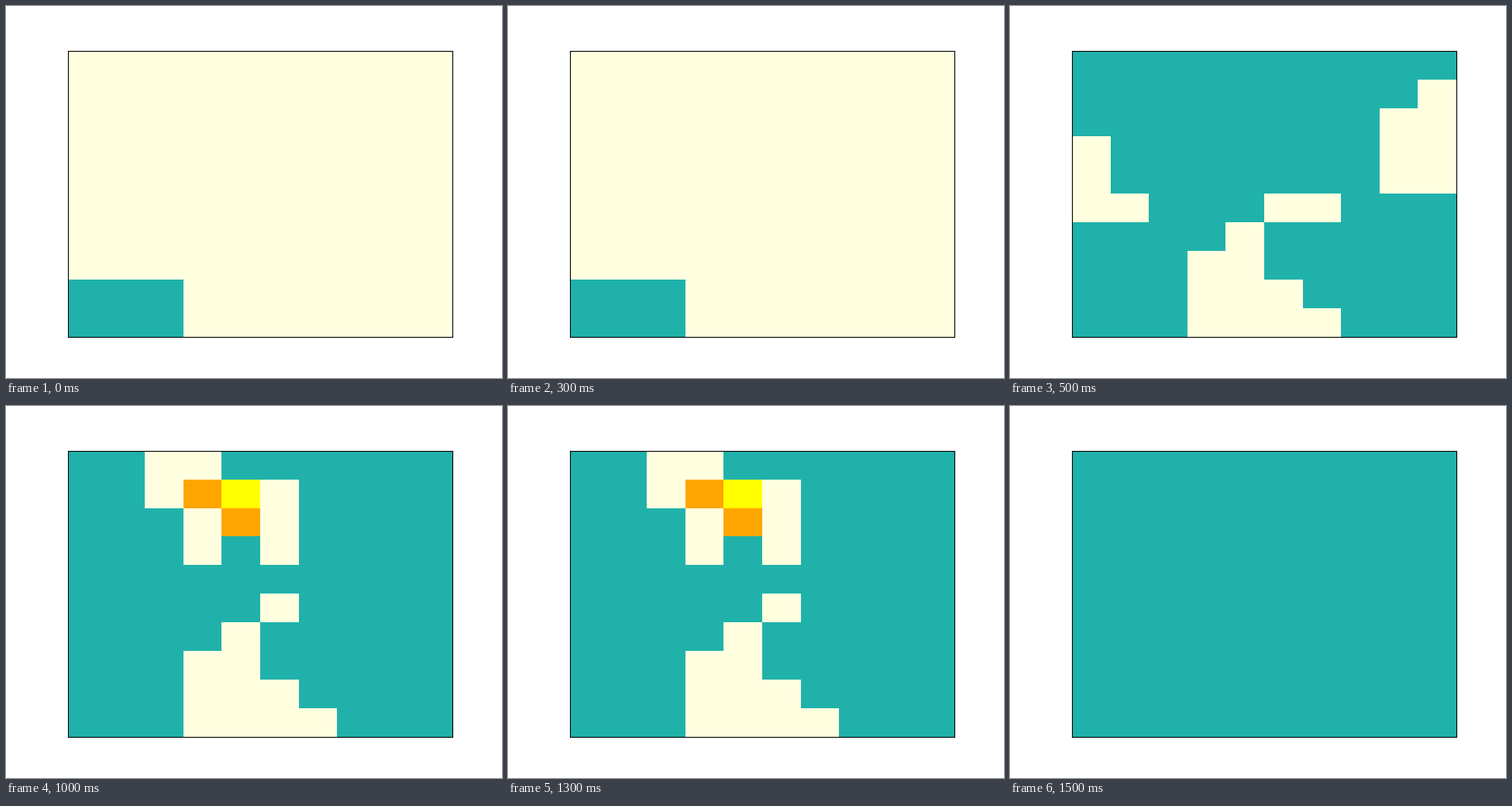
Animation of 640x480 px, one loop 2 s. Source, as a matplotlib script:

```python
import numpy as np
import matplotlib.pyplot as plt
from matplotlib.animation import FuncAnimation
from matplotlib.colors import ListedColormap

SIZE = 10
EMPTY, FILLED, WARM, HOT = range(4)
COLORS = ["lightyellow", "lightseagreen", "orange", "yellow"]


def grid(base, *blocks):
    """Grid of one state with blocks (state, top, left, height, width) on it."""
    cells = np.full((SIZE, SIZE), base)
    for state, top, left, height, width in blocks:
        cells[top:top + height, left:left + width] = state
    return cells


# The stepped gap at the bottom
hill = [
    (EMPTY, 6, 4, 1, 1),
    (EMPTY, 7, 3, 3, 2),
    (EMPTY, 8, 5, 2, 1),
    (EMPTY, 9, 6, 1, 1),
]

stages = [
    grid(EMPTY, (FILLED, 8, 0, 2, 3)),
    grid(
        FILLED, *hill,
        (EMPTY, 1, 9, 4, 1),
        (EMPTY, 2, 8, 3, 1),
        (EMPTY, 3, 0, 3, 1),
        (EMPTY, 5, 1, 1, 1),
        (EMPTY, 5, 5, 1, 2),
    ),
    grid(
        FILLED, *hill,
        (EMPTY, 0, 2, 2, 2),
        (EMPTY, 2, 3, 2, 1),
        (EMPTY, 1, 5, 3, 1),
        (EMPTY, 5, 5, 1, 1),
        (WARM, 1, 3, 1, 1),
        (WARM, 2, 4, 1, 1),
        (HOT, 1, 4, 1, 1),
    ),
    grid(FILLED),
]

fig, ax = plt.subplots(figsize=(6.4, 4.8), dpi=100)
mesh = ax.pcolormesh(stages[0], cmap=ListedColormap(COLORS),
                     vmin=-0.5, vmax=len(COLORS) - 0.5)
ax.set(xlim=(0, SIZE), ylim=(SIZE, 0), xticks=[], yticks=[])


def update(i):
    mesh.set_array(stages[i])
    return [mesh]


anim = FuncAnimation(fig, update, frames=len(stages), interval=500,
                     repeat=True, repeat_delay=0)
plt.show()
```
